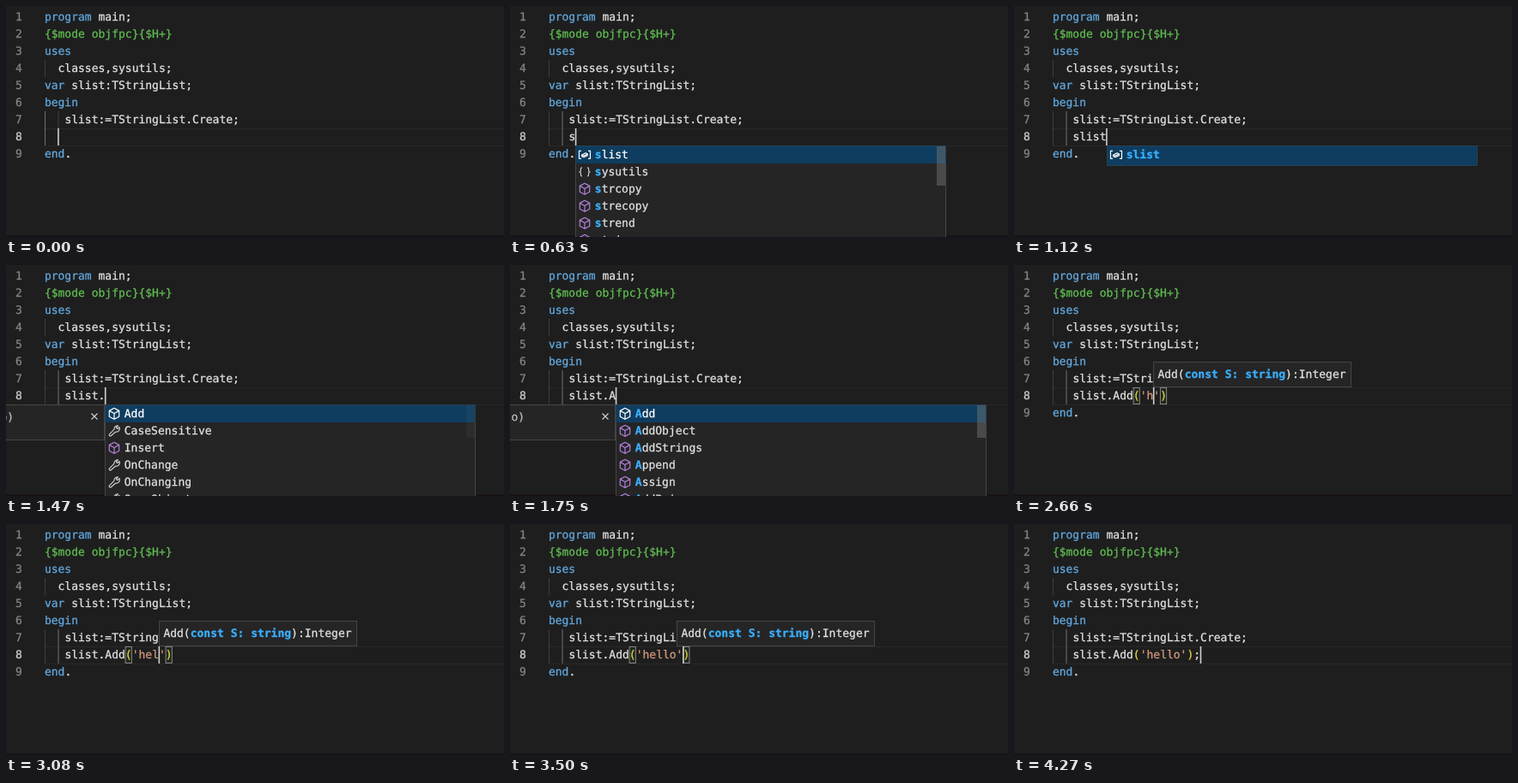
Animation, 580 px wide and 270 px high, one loop 4340 ms. Source, as an HTML page:

```html
<!DOCTYPE html>
<html lang="en">
<head>
<meta charset="utf-8">
<title>Code completion</title>
<style>
  html, body { margin: 0; width: 100%; height: 100%; overflow: hidden; background: #1e1e1e; }
  svg { display: block; }
  text {
    font: 13px "DejaVu Sans Mono", "Liberation Mono", monospace;
    text-rendering: geometricPrecision;
    white-space: pre;
  }
  text, tspan { fill: currentColor; stroke: currentColor; stroke-width: .28px; }
</style>
</head>
<body>
<svg id="stage" width="580" height="270" viewBox="0 0 580 270"></svg>
<script>
const LOOP = 4340, CHAR = 7.826, ORIGIN = 44.9, LINE = 20, EDIT_TOP = 143;
const C = {
  bg: '#1e1e1e', panel: '#252526', border: '#454545', text: '#e2e2e2', keyword: '#62a9e0',
  directive: '#60bd52', string: '#d4987e', bracket: '#ecd23c', match: '#3bb0ff',
  selected: '#0e3d5f', method: '#b180d7', number: '#858585'
};

const colX = col => ORIGIN + col * CHAR;
const baseline = line => 17 + LINE * (line - 1);
const rect = (x, y, w, h, fill, extra = '') =>
  `<rect x="${x}" y="${y}" width="${w}" height="${h}" fill="${fill}" ${extra}/>`;
const panel = (x, y, w, h) =>
  rect(x + .5, y + .5, w - 1, h - 1, C.panel, `stroke="${C.border}"`);
const span = (s, color, bold) =>
  `<tspan color="${color}"${bold ? ' font-weight="bold"' : ''}>${s}</tspan>`;
const text = (x, y, body, color = C.text) => `<text x="${x}" y="${y}" color="${color}">${body}</text>`;
const stroke = (d, color) =>
  `<path d="${d}" fill="none" stroke="${color}" stroke-width="1.2" stroke-linejoin="round"/>`;

const icons = {
  variable: 'M-4-4.5H-6.5V4.5H-4M4-4.5H6.5V4.5H4M-3.5 .5L1-2 3.5-.8 3.2 1-1 3-3.3 2ZM-3.5 .5L-1 1.3 3.5-.8',
  module: 'M-3-5Q-4.6-5-4.6-3.4V-1.5Q-4.6 0-6.2 0Q-4.6 0-4.6 1.5V3.4Q-4.6 5-3 5' +
          'M3-5Q4.6-5 4.6-3.4V-1.5Q4.6 0 6.2 0Q4.6 0 4.6 1.5V3.4Q4.6 5 3 5',
  method: 'M0-6.5L5.7-3.4V3.4L0 6.5-5.7 3.4V-3.4ZM-5.7-3.4L0-.3 5.7-3.4M0-.3V6.5',
  property: 'M-5.6 4L0-1.6A4 4 0 0 1 4.5-6L2.3-3.8 3.8-2.2 6-4.4A4 4 0 0 1 1.6 1.2L-3.8 6A1.4 1.4 0 0 1-5.6 4Z'
};
const kinds = (kind, names) => names.split(' ').map(name => ({ kind, name }));

const variable = kinds('variable', 'slist');
const globals = [...variable, ...kinds('module', 'sysutils'),
  ...kinds('method', 'strcopy strecopy strend stricomp')];
const members = [...kinds('method', 'Add'), ...kinds('property', 'CaseSensitive'),
  ...kinds('method', 'Insert'), ...kinds('property', 'OnChange OnChanging OwnsObjects')];
const adders = kinds('method', 'Add AddObject AddStrings Append Assign AddPair');

// Each track is a list of [start, value]; "|" marks the caret.
const typing = [
  [0, '  |'], [210, '   |'], [490, '   s|'], [700, '   sl|'], [840, '   sli|'], [910, '   slis|'],
  [980, '   slist|'], [1190, '   slist.|'], [1750, '   slist.A|'], [1890, '   slist.Add|'],
  [2100, '   slist.Add(|)'], [2310, "   slist.Add('|')"], [2590, "   slist.Add('h|')"],
  [2870, "   slist.Add('he|')"], [3010, "   slist.Add('hel|')"], [3150, "   slist.Add('hell|')"],
  [3290, "   slist.Add('hello|')"], [3500, "   slist.Add('hello'|)"],
  [3640, "   slist.Add('hello')|"], [3780, "   slist.Add('hello');|"]
];
const menus = [
  [0, null],
  [560, { col: 4, items: globals, typed: 1, thumb: 46, glow: .4 }],
  [630, { col: 4, items: globals, typed: 1, thumb: 46, glow: 1 }],
  [770, { col: 5, items: variable, typed: 2 }],
  [840, { col: 6, items: variable, typed: 3 }],
  [910, { col: 7, items: variable, typed: 4 }],
  [1120, { col: 8, items: variable, typed: 5 }],
  [1260, null],
  [1470, { col: 9, items: members, typed: 0, thumb: 38, glow: .2, docs: true }],
  [1540, { col: 9, items: members, typed: 0, thumb: 38, glow: 1, docs: true }],
  [1750, { col: 10, items: adders, typed: 1, thumb: 38, glow: 1, docs: true }],
  [1890, null]
];
const hints = [
  [0, 0], [2170, 13], [2310, 14], [2660, 15], [2940, 16], [3080, 17], [3220, 18],
  [3290, 19], [3570, 20], [3710, 21], [3780, 0]
];
const at = (track, t) => track.findLast(([start]) => start <= t)[1];

function code() {
  const kw = s => span(s, C.keyword);
  const lines = [
    [0, kw('program') + ' main;'], [0, span('{$mode objfpc}{$H+}', C.directive)], [0, kw('uses')],
    [2, 'classes,sysutils;'], [0, kw('var') + ' slist:TStringList;'], [0, kw('begin')],
    [3, 'slist:=TStringList.Create;'], [0, ''], [0, kw('end') + '.']
  ];
  return lines.map(([col, body], i) =>
    text(11, baseline(i + 1), i + 1, i === 7 ? '#d0d0d0' : C.number) +
    text(colX(col), baseline(i + 1), body)).join('');
}

function guides(inner) {
  const dim = '#404040', lit = '#707070';
  return rect(45, 63, 1, 20, dim) + rect(45, 123, 1, 40, inner ? dim : lit) +
    rect(60.5, 123, 1, inner ? 40 : 20, inner ? lit : dim);
}

function editLine(marked, showCaret) {
  const caret = marked.indexOf('|');
  const line = marked.replace('|', '');
  const paint = line.trim().replace(/'[^']*'|[()]/g,
    s => span(s, s[0] === "'" ? C.string : C.bracket));
  const open = line.indexOf('('), close = line.indexOf(')');
  let out = '';
  if (open >= 0 && caret > open && caret <= close + 1) {
    for (const col of [open, close])
      out += rect(colX(col) + .3, EDIT_TOP + .5, CHAR - .6, 19, '#1d2a20', 'stroke="#888"');
  }
  out += text(colX(3), baseline(8), paint);
  if (showCaret) out += rect(colX(caret) - .4, EDIT_TOP, 1.6, LINE, '#d0d0d0');
  return out;
}

function menu({ col, items, typed, thumb, glow, docs }) {
  const x = Math.round(colX(col)), top = 163, width = 432;
  const single = items.length === 1;
  let out = '';
  if (docs) {
    out += panel(-300, top, x + 300, 42) + text(x - 121.5, 181.5, 'o)', '#bcbcbc') +
      stroke(`M${x - 15.5} 173.5l7 7m0-7l-7 7`, '#cccccc');
  }
  out += panel(x, top, width, single ? 24 : 140) +
    rect(x + .5, top + .5, width - 1, single ? 23 : LINE + .5, C.selected);
  items.forEach(({ kind, name }, i) => {
    const y = top + 11 + LINE * i;
    const iconColor = i === 0 ? '#ffffff' : kind === 'method' ? C.method : '#cccccc';
    const body = span(name.slice(0, typed), C.match, true) +
      span(name.slice(typed), i ? C.text : '#ffffff');
    out += `<g transform="translate(${x + 11} ${y - .2})">${stroke(icons[kind], iconColor)}</g>` +
      text(x + 22.8, y + 4, body);
  });
  if (thumb) out += rect(x + width - 11, top + 1, 10, thumb, '#797979', `opacity="${.45 * glow}"`);
  return out;
}

function hint(col) {
  const x = Math.round(colX(col));
  return panel(x, 113, 231, 30) +
    text(x + 5.4, 132, 'Add(' + span('const S: string', C.match, true) + '):Integer');
}

const stage = document.getElementById('stage');
const base = rect(0, 0, 580, 270, C.bg) + rect(0, 268.5, 580, 1.5, '#170f14') +
  rect(44, 143, 536, 1, '#282828') + rect(44, 163, 536, 1, '#282828') + code();
let shown = '';

function draw(t) {
  const line = at(typing, t), list = at(menus, t), hintCol = at(hints, t);
  const caretOn = t < 3990 || t >= 4270;
  const picture = base + guides(line.indexOf('|') > 2) + editLine(line, caretOn) +
    (list ? menu(list) : '') + (hintCol ? hint(hintCol) : '');
  if (picture !== shown) stage.innerHTML = shown = picture;
}

const began = performance.now();
function tick() {
  draw((performance.now() - began) % LOOP);
  requestAnimationFrame(tick);
}
tick();
</script>
</body>
</html>
```
